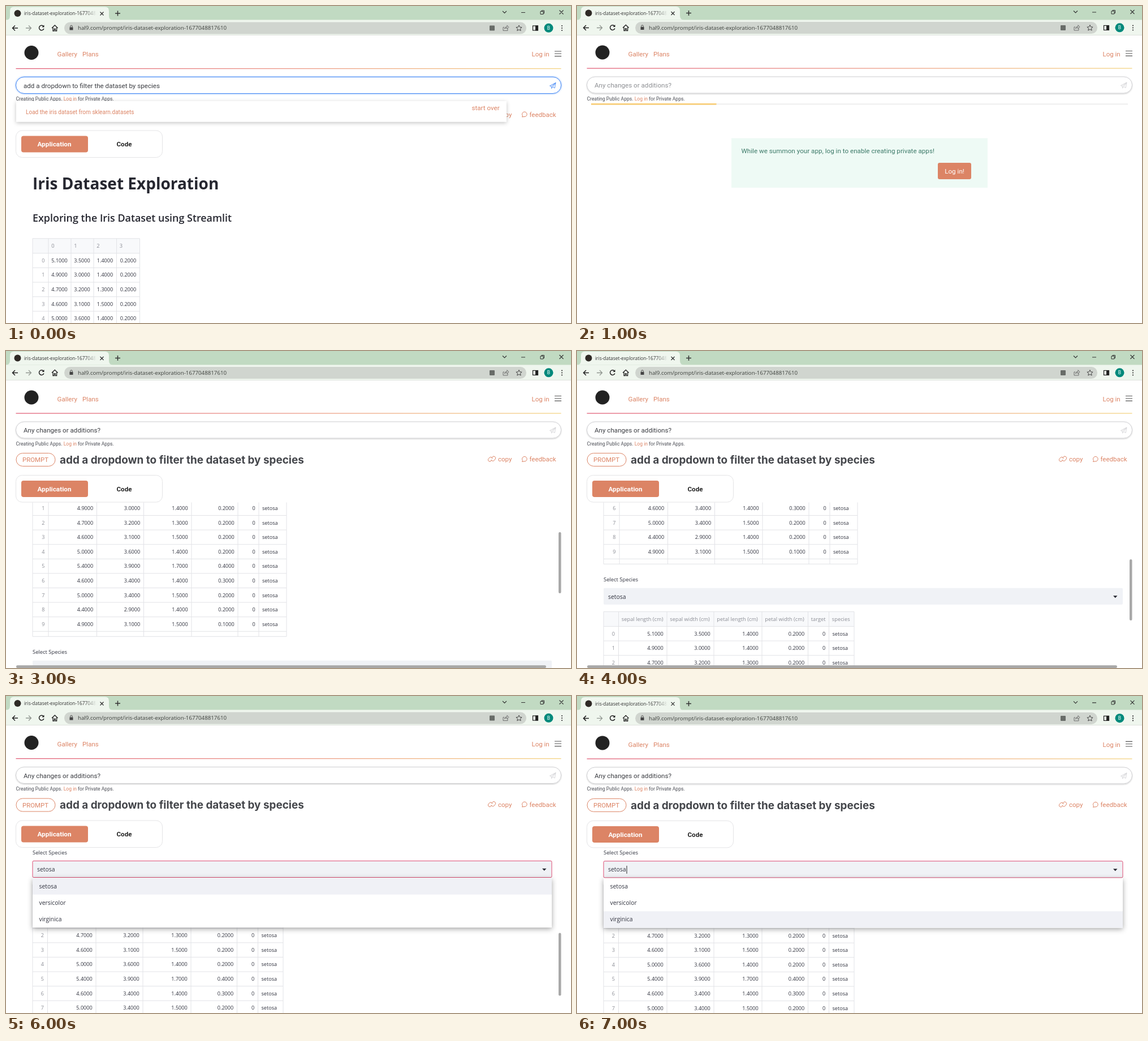
An HTML page that plays this animation: 999 by 560 pixels, repeating every 8000 ms.

```html
<!DOCTYPE html>
<html lang="en">
<head>
<meta charset="utf-8">
<title>Iris dataset exploration</title>
<style>
html, body { margin: 0; width: 100%; height: 100%; overflow: hidden; background: #fff; }
svg { display: block; width: 999px; height: 560px; }
text { white-space: pre; font-family: Roboto, sans-serif; }
.app { font-family: "Open Sans", sans-serif; }
</style>
</head>
<body>
<svg id="stage" viewBox="0 0 999 560">
  <defs>
    <linearGradient id="rule"><stop stop-color="#df5570"/><stop offset=".5" stop-color="#ea9180"/><stop offset="1" stop-color="#f4d27c"/></linearGradient>
    <linearGradient id="fade"><stop stop-color="#eff6ee" stop-opacity="0"/><stop offset="1" stop-color="#eff6ee"/></linearGradient>
    <filter id="shadow" x="-5%" y="-40%" width="110%" height="190%"><feDropShadow dx="0" dy="2" stdDeviation="3.5" flood-opacity=".24"/></filter>
    <filter id="deep" x="-5%" y="-40%" width="110%" height="190%"><feDropShadow dx="0" dy="2.5" stdDeviation="5" flood-opacity=".36"/></filter>
    <filter id="soft" x="-2%" y="-40%" width="104%" height="180%"><feDropShadow dx="0" dy="1" stdDeviation="1.3" flood-opacity=".2"/></filter>
    <filter id="glow" x="-2%" y="-40%" width="104%" height="180%"><feDropShadow dx="0" dy="0" stdDeviation="1.8" flood-color="#4c8df5" flood-opacity=".8"/></filter>
    <clipPath id="view"><rect y="267.5" width="999" height="293"/></clipPath>
  </defs>
  <rect width="999" height="26" fill="#c1dac2"/>
  <rect y="24.5" width="999" height="26.5" fill="#eff6ee"/>
  <rect y="51" width="999" height="1" fill="#dfe2de"/>
  <g id="screen"></g>
</svg>
<script>
const CORAL = '#dc8465', INK = '#31333f', DARK = '#3b3d42', GREY = '#8b8d95', LINE = '#e2e3e7';
const screen = document.getElementById('screen');

const rect = (x, y, w, h, fill, extra = '') =>
  `<rect x="${x}" y="${y}" width="${w}" height="${h}" fill="${fill}" ${extra}/>`;
const circle = (x, y, r, fill) => `<circle cx="${x}" cy="${y}" r="${r}" fill="${fill}"/>`;
const path = (d, color, width = 1, fill = 'none') =>
  `<path d="${d}" fill="${fill}" stroke="${color}" stroke-width="${width}"/>`;
// y is the middle of the capitals
const text = (x, y, size, color, str, extra = '') =>
  `<text x="${x}" y="${y + size * 0.36}" font-size="${size}" fill="${color}" ${extra}>${str}</text>`;
const appText = (x, y, size, color, str, extra = '') =>
  text(x, y, size, color, str, 'class="app" ' + extra);

const IRIS = `5.1 3.5 1.4 0.2|4.9 3.0 1.4 0.2|4.7 3.2 1.3 0.2|4.6 3.1 1.5 0.2|5.0 3.6 1.4 0.2|5.4 3.9 1.7 0.4
|4.6 3.4 1.4 0.3|5.0 3.4 1.5 0.2|4.4 2.9 1.4 0.2|4.9 3.1 1.5 0.1`.split('|').map(row => row.trim().split(' '));
const PLAIN_HEADS = ['0', '1', '2', '3'];
const FULL_HEADS = ['sepal length (cm)', 'sepal width (cm)', 'petal length (cm)', 'petal width (cm)', 'target', 'species'];
const PLAIN_COLS = [47, 75, 115, 155, 195.5, 236.5];
const WIDE_COLS = [47, 75, 160.5, 243.5, 328, 410, 447, 496];
const NARROW_COLS = [47, 73.5, 159, 242, 327, 408.5, 445.5, 490];

function table(cols, heads, top) {
  const rowHeight = 25.6, height = 291, right = cols[cols.length - 1];
  let out = rect(47, top, right - 47, 26, '#f8f9fb'), grid = '';
  heads.forEach((head, i) => out += appText(cols[i + 1] + 5.3, top + 13, 9.3, GREY, head));
  IRIS.forEach((row, i) => {
    const y = top + 38.8 + i * rowHeight;
    out += appText(cols[1] - 6.5, y, 9.1, GREY, i, 'text-anchor="end"');
    const cells = row.map(v => v + '000');
    if (heads.length > 4) cells.push('0');
    cells.forEach((v, c) => out += appText(cols[c + 2] - 6.3, y, 9.1, INK, v, 'text-anchor="end"'));
    if (heads.length > 4) out += appText(cols[6] + 6, y, 9.1, INK, 'setosa');
  });
  for (let i = 0; i < 11; i++) grid += `M47 ${top + 26 + i * rowHeight}H${right}`;
  cols.forEach(x => grid += `M${x} ${top}v${height}`);
  return out + path(grid + `M47 ${top}H${right}M47 ${top + height}H${right}`, LINE);
}

function browser() {
  return path('M0 24.5Q7 24.5 7 17V8Q7 1 14 1H175Q182 1 182 8V17Q182 24.5 189 24.5Z', 'none', 0, '#eff6ee')
    + circle(20.5, 12.5, 6, '#2f2a26')
    + appText(32, 12.8, 8.4, '#333', 'iris-dataset-exploration-16770488')
    + rect(140, 4, 20, 18, 'url(#fade)') + rect(160, 4, 14, 18, '#eff6ee')
    + path('M166.5 10l6 6m0-6l-6 6', '#333', 1.3)
    + path('M193 12.5h9m-4.5-4.5v9', '#333', 1.5)
    + path('M878 8.5l3.5 3.5 3.5-3.5M911 11h7M978.5 7l7 7m0-7l-7 7', '#333', 1.1)
    + path('M945 9h5v5h-5zM947 9v-1.5h4.5v5H950', '#333', 1)
    + path('M21 38.5H11.5m4.5-4.5l-4.5 4.5 4.5 4.5', '#222', 1.5)
    + path('M35 38.5h9.5m-4.5-4.5l4.5 4.5-4.5 4.5', '#909690', 1.3)
    + path('M66.3 35.5a4.3 4.3 0 1 0 .6 4', '#222', 1.5) + path('M67.5 33v4h-4z', 'none', 0, '#222')
    + path('M81 38.5l5.3-5 5.3 5M83 37.5v6h2.3v-3.5h2v3.5h2.3v-6', '#222', 1.3)
    + rect(103, 28, 817, 21, '#d0d5cf', 'rx="10.5"')
    + rect(112.5, 37, 6, 5, '#444') + path('M113.8 37v-1.5a1.7 1.7 0 0 1 3.4 0V37', '#444', 1)
    + appText(127, 38.3, 9.73, '#3c403c', 'hal9.com/prompt/iris-dataset-exploration-1677048817610')
    + rect(855, 34, 9, 9, '#686c68', 'rx="1"')
    + path('M881 37h-2v6h8v-3M881.5 40q.5-4 4.5-4v-2.3l3 3.3-3 3.3v-2.3q-3 0-4.5 2z', '#666', 0.9)
    + path('M907 33.5l1.5 3.3 3.6.4-2.7 2.4.8 3.5-3.2-1.8-3.2 1.8.8-3.5-2.7-2.4 3.6-.4z', '#444', 1)
    + rect(931.5, 34.5, 9, 8, 'none', 'stroke="#222" stroke-width="1.2"') + rect(936, 34, 5, 9, '#222')
    + circle(959.5, 38.3, 8, '#00897b') + text(959.5, 38.3, 8.5, '#fff', 'B', 'text-anchor="middle"')
    + [34.5, 38.5, 42.5].map(y => circle(983, y, 1.1, '#333')).join('');
}

function header({ query, focus, busy }) {
  const plane = focus ? '#4c8df5' : '#d3d3d6';
  return circle(45, 82, 12.5, '#222')
    + text(90.5, 84.7, 11.6, CORAL, 'Gallery') + text(135, 84.7, 11.6, CORAL, 'Plans')
    + text(929.5, 84.7, 11.5, CORAL, 'Log in')
    + path('M970 79.5h12m-12 4.3h12m-12 4.3h12', '#555', 1.1)
    + rect(17.5, 109.5, 964, 1.2, 'url(#rule)')
    + rect(17.5, 125, 964, 29, '#fff', `rx="14.5" stroke="${focus ? '#4c8df5' : '#cfcfd2'}" filter="url(#${focus ? 'glow' : 'soft'})"`)
    + text(31, 140, 11.62, busy ? '#8d8f93' : DARK, query)
    + path('M961.5 140.5l10.5-5.5-1.8 9.5-3.7-2-1.8 2.7-.5-3.5zM964.2 141.7l7.8-6.7-5.5 7.5', plane, 0.9)
    + text(17.5, 163.5, 8.6, '#4b4d55', `Creating Public Apps. <tspan fill="${CORAL}">Log in</tspan> for Private Apps.`);
}

function promptBar() {
  return rect(18, 180.5, 69, 23, '#fff', `rx="11.5" stroke="${CORAL}"`)
    + text(29, 192.2, 11.4, CORAL, 'PROMPT')
    + text(95, 192, 18.9, '#44464b', 'add a dropdown to filter the dataset by species',
      'style="font-family:Inter,sans-serif;font-weight:700"');
}

function tools() {
  return path('M858 192.5a3 3 0 0 1-1 2.3 3 3 0 0 1-4-4.3l2-2.3a3 3 0 0 1 5 2M859 189.3a3 3 0 0 1 1-2 3 3 0 0 1 5 3.7l-2 2.5a3 3 0 0 1-5-1.5', CORAL, 1)
    + text(870, 191.2, 11.5, CORAL, 'copy')
    + path('M912.5 195.5l1-2a4.3 4.3 0 1 1 2.5 1.5z', CORAL, 1)
    + text(925.5, 191.2, 11.5, CORAL, 'feedback');
}

function tabs() {
  return rect(17.5, 219.5, 259, 47.5, '#fff', 'rx="11" stroke="#e4e4e6"')
    + rect(27, 229, 118, 29, CORAL, 'rx="4"')
    + text(85.5, 243.7, 11.8, '#fff', 'Application', 'text-anchor="middle" font-weight="700"')
    + text(209, 243.7, 11.6, '#222', 'Code', 'text-anchor="middle" font-weight="700"');
}

function history() {
  return rect(18, 167.5, 867, 36.5, '#fff', 'filter="url(#shadow)"')
    + text(35, 186.7, 10.05, CORAL, 'Load the iris dataset from sklearn.datasets')
    + text(823.5, 179.3, 11.6, CORAL, 'start over');
}

function loading() {
  return rect(25, 172, 949, 2.6, '#f1f1f1') + rect(25, 172, 221.5, 2.6, '#f8cd76')
    + rect(273, 233.5, 453, 87.5, '#eefaf5')
    + text(290.5, 255.7, 11.67, '#3d7a69', 'While we summon your app, log in to enable creating private apps!')
    + rect(638, 277, 59, 29, CORAL, 'rx="3"')
    + text(667.5, 292, 11.7, '#fff', 'Log in!', 'text-anchor="middle"');
}

function application({ scroll = 0, plain, open, caret }) {
  const at = y => y - scroll;
  let out = appText(47, at(313.5), 28, '#262730', 'Iris Dataset Exploration', 'font-weight="700"')
    + appText(47, at(374.5), 17.9, '#262730', 'Exploring the Iris Dataset using Streamlit', 'font-weight="600"')
    + table(plain ? PLAIN_COLS : WIDE_COLS, plain ? PLAIN_HEADS : FULL_HEADS, at(410.3));
  if (!plain) {
    out += appText(47, at(729), 9.4, INK, 'Select Species')
      + rect(47, at(743.8), 918, 29.2, '#f0f2f6', `rx="2" ${open === undefined ? '' : 'stroke="#dd4c73"'}`)
      + appText(55, at(758.8), 10.4, INK, 'setosa')
      + path(`M948 ${at(757.3)}h7.5l-3.75 4z`, 'none', 0, '#262730')
      + table(NARROW_COLS, FULL_HEADS, at(785.5));
    if (caret) out += rect(87.5, at(752), 1, 14, '#222');
    if (open !== undefined) {
      out += rect(47, at(774), 918, 87.5, '#fff', 'filter="url(#deep)"')
        + rect(47, at(774 + open * 29.2), 918, 29.2, '#f0f1f6');
      ['setosa', 'versicolor', 'virginica'].forEach((name, i) =>
        out += appText(58.5, at(788.3 + i * 29.2), 10.4, INK, name));
    }
  }
  return `<g clip-path="url(#view)">${out}</g>`;
}

// The horizontal bar goes when the list opens, and the thumb grows a little
function scrollbars({ scroll, open }) {
  const closed = open === undefined;
  return rect(977, 320 + (scroll - 197) * 0.375 + (closed ? 0 : 2), 4.5, closed ? 108 : 111, '#a8a8a8', 'rx="2.2"')
    + (closed ? rect(18, 555.3, 937, 4.7, '#a8a8a8', 'rx="2.3"') : '');
}

// One scene per second
const ASK = 'Any changes or additions?';
const scenes = [
  { query: 'add a dropdown to filter the dataset by species', focus: true, plain: true, drift: 0.5 },
  { query: ASK, busy: true },
  { query: ASK },
  { query: ASK, scroll: 197, bars: true },
  { query: ASK, scroll: 325, bars: true },
  { query: ASK, scroll: 453, bars: true },
  { query: ASK, scroll: 453, bars: true, open: 0, drift: 0.5 },
  { query: ASK, scroll: 453, open: 2, caret: true, drift: 0.9 },
];

function draw(scene) {
  let out = browser() + header(scene);
  if (scene.busy) out += loading();
  else {
    out += application(scene) + tabs() + tools() + (scene.focus ? history() : promptBar());
    if (scene.bars) out += scrollbars(scene);
  }
  screen.setAttribute('transform', `translate(0 ${scene.drift || 0})`);
  screen.innerHTML = out;
}

let shown = -1;
function tick() {
  const index = Math.floor(performance.now() / 1000) % scenes.length;
  if (index !== shown) draw(scenes[shown = index]);
  requestAnimationFrame(tick);
}
tick();
</script>
</body>
</html>
```
